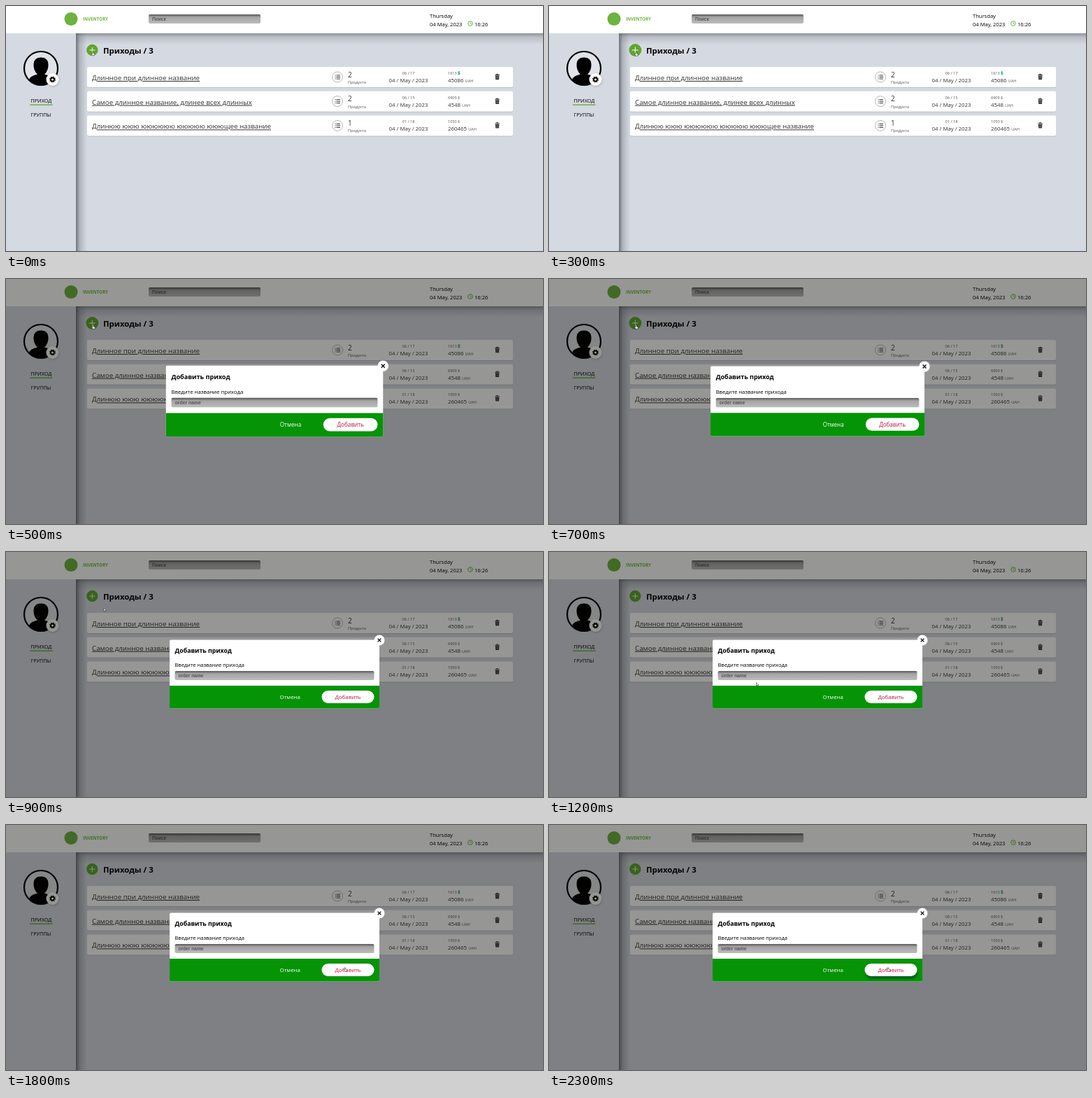
These frames come from a looping animation (768 px wide and 350 px high, 2.5 s). An HTML page:

```html
<!DOCTYPE html>
<html lang="ru">
<head>
<meta charset="utf-8">
<style>
  html, body { margin: 0; height: 100%; overflow: hidden; background: #d5d9e2; }
  svg { display: block; width: 768px; height: 350px; font-family: "Open Sans", "Noto Sans", sans-serif; }
  .field { font: bold 6.6px "Liberation Sans", sans-serif; fill: #555; }
</style>
</head>
<body>
<svg id="stage" viewBox="0 0 768 350">
  <defs>
    <linearGradient id="left"><stop stop-color="#4c505a" stop-opacity=".75"/><stop offset=".35" stop-color="#5c606a" stop-opacity=".3"/><stop offset="1" stop-color="#6c707a" stop-opacity="0"/></linearGradient>
    <linearGradient id="top" x2="0" y2="1"><stop stop-color="#5c606a" stop-opacity=".6"/><stop offset=".35" stop-color="#6c707a" stop-opacity=".25"/><stop offset="1" stop-color="#6c707a" stop-opacity="0"/></linearGradient>
    <linearGradient id="inset" x2="0" y2="1"><stop stop-color="#555"/><stop offset=".3" stop-color="#a4a4a4"/><stop offset="1" stop-color="#bcbcbc"/></linearGradient>
    <filter id="soft" x="-30%" y="-60%" width="160%" height="220%"><feGaussianBlur stdDeviation="1.8"/></filter>
  </defs>
  <g id="page"></g>
  <g id="modal"></g>
  <g id="cursor" fill="#fff" stroke="#222" stroke-width=".7" stroke-linejoin="round">
    <path id="hand" d="M-1 0Q0-1 1 0V2.5L3.4 3.3Q4 3.6 3.7 5L3 7H-.6L-2.6 4.3Q-2.6 3.3-1 4Z"/>
    <path id="arrow" d="M0 0V6L1.5 4.7L2.6 7L3.6 6.5L2.6 4.4H4.4Z"/>
  </g>
</svg>
<script>
const $ = id => document.getElementById(id);
const text = (s, x, y, size, attrs = '') => `<text x="${x}" y="${y}" font-size="${size}" ${attrs}>${s}</text>`;
const rect = (x, y, w, h, fill, r = 0, attrs = '') =>
  `<rect x="${x}" y="${y}" width="${w}" height="${h}" rx="${r}" fill="${fill}" ${attrs}/>`;
const circle = (x, y, r, fill, attrs = '') => `<circle cx="${x}" cy="${y}" r="${r}" fill="${fill}" ${attrs}/>`;
const field = (s, x, y, w) => rect(x, y, w, 13, 'url(#inset)', 2) + `<text class="field" x="${x + 5}" y="${y + 9.3}">${s}</text>`;
const bold = 'font-weight="700"', grey = 'fill="#555"', middle = 'text-anchor="middle"';

const trash = `<path d="M699.3 98.5h6.6M701.5 98.3v-1h2.2v1" stroke="#333" fill="none"/>
  <path d="M699.8 99.6h5.6l-.4 5.6h-4.8z" fill="#333"/><path d="M701.6 100.6v3.6M703.6 100.6v3.6" stroke="#aaa" stroke-width=".6"/>`;
const list = circle(474, 101.5, 7.5, '#fff', 'stroke="#999" stroke-width=".7"') +
  [99, 101.5, 104].map(y => `<path d="M470.5 ${y}h1M472.5 ${y}h5.5" stroke="#333"/>`).join('');

const row = ([title, count, time, usd, uah, mark], i) => `<g transform="translate(0 ${i * 34.7})">
  ${rect(116, 88, 609, 29, '#8a8f9a', 2, 'opacity=".35"')}${rect(116, 87, 609, 29, '#fff', 2)}
  ${text(title, 123, 106, 9.75, 'fill="#333" text-decoration="underline"')}
  ${list}${text(count, 489, 101.8, 10, 'fill="#333"')}${text('Продукта', 489, 111, 5.7, grey)}
  ${text(time, 575.5, 98, 5.7, grey + middle)}${text('04 / May / 2023', 575.5, 109, 7.8, 'fill="#333"' + middle)}
  ${text(`${usd} <tspan ${mark}>$</tspan>`, 632, 98, 5.5, grey)}
  ${text(`${uah} <tspan font-size="5.6" fill="#555">UAH</tspan>`, 632, 109, 7.9, 'fill="#333"')}${trash}</g>`;

const rows = [
  ['Длинное при длинное название', 2, '06 / 17', 1613, 45086, 'fill="#1a9a88" font-weight="700" font-size="6.5"'],
  ['Самое длинное название, длинее всех длинных', 2, '06 / 15', 6909, 4548, ''],
  ['Длинюю ююю юююююю ююююю ююющее название', 1, '01 / 18', 1050, 260465, '']
];

$('page').innerHTML =
  rect(0, 0, 768, 350, '#d5d9e2') + rect(100, 39, 16, 311, 'url(#left)') + rect(100, 39, 668, 16, 'url(#top)') +
  rect(0, 0, 768, 39, '#fff') + circle(93, 18.5, 9.5, '#6cb33f') +
  text('INVENTORY', 110, 21, 6.2, bold + 'fill="#72b840"') + field('Поиск', 204, 12, 160) +
  text('Thursday', 606, 16.5, 7.6) + text('04 May, 2023', 606, 28.5, 7.6) + text('16:26', 670, 28.5, 7.6) +
  circle(664, 25, 3.3, 'none', 'stroke="#6cb33f"') + '<path d="M664 23v2.2h1.8" fill="none" stroke="#6cb33f" stroke-width=".8"/>' +
  circle(50, 89, 24, '#e0e3ea', 'stroke="#000" stroke-width="2.2"') +
  '<path d="M33 105.5Q34 100 45 97.5Q39 92 39.5 83Q40 73.5 50 73.5T60.500 83Q61 92 55 97.5Q66 100 67 105.500A24 24 0 0 1 33 105.500Z"/>' +
  circle(67, 106, 9, '#777', 'opacity=".5" filter="url(#soft)"') + circle(66.5, 105, 9, '#fff') +
  circle(66.5, 105, 2.5, 'none', 'stroke="#000" stroke-width="1.8"') +
  circle(66.5, 105, 3.9, 'none', 'stroke="#000" stroke-width="1.2" stroke-dasharray="1.53"') +
  text('ПРИХОД', 50.3, 138, 7.3, middle) + rect(34, 140.5, 32.5, 1.5, '#6cb33f') + text('ГРУППЫ', 50, 158.3, 7.1, middle) +
  `<g id="plus">${circle(0, 0, 8.2, '#5fa62f')}<path d="M-4 0H4M0-4V4" stroke="#fff" stroke-width=".9"/></g>` +
  text('Приходы / 3', 139, 67.5, 11.4, bold) + rows.map(row).join('');

$('modal').innerHTML =
  rect(0, 0, 768, 350, '#070700', 0, 'opacity=".42"') + rect(234, 125.5, 300, 98, '#fff', 2) +
  '<path d="M234 191H534V221.500Q534 223.500 532 223.500H236Q234 223.500 234 221.500Z" fill="#059405"/>' +
  text('Добавить приход', 241.5, 144, 8.8, bold) + text('Введите название прихода', 241.5, 164, 7.5) +
  field('order name', 241.5, 170, 285) + text('Отмена', 391.5, 210, 7.9, 'fill="#fff"') +
  rect(453, 202, 74, 18, '#023', 9, 'id="shadow" filter="url(#soft)"') + rect(451.5, 198, 75, 18, '#fff', 9, 'id="button"') +
  text('Добавить', 489, 210, 7.9, 'fill="#c2103c"' + middle) +
  circle(534, 126, 7.5, '#fff') + '<path d="M531.600 123.600l4.800 4.800m0-4.800l-4.800 4.800" stroke="#000" stroke-width="1.3"/>';

// Linear interpolation through [time, value] pairs
function track(keys, t) {
  const i = keys.findIndex(k => k[0] > t);
  if (i < 0) return keys[keys.length - 1][1];
  if (!i) return keys[0][1];
  const [t0, a] = keys[i - 1], [t1, b] = keys[i];
  return a + (b - a) * (t - t0) / (t1 - t0);
}
const pop = [[400, .96], [500, 1.035], [600, 1.035], [700, 1.02], [800, 1]];
const shade = [[1400, 0], [1600, .4], [1700, .3], [1800, 0], [2000, 0], [2300, .45]];
const cursorX = [[200, 124], [300, 124.5], [800, 124.5], [900, 140], [1200, 296.5], [1400, 514], [1500, 490], [1600, 485]];
const cursorY = [[200, 65.5], [300, 66], [800, 66], [900, 80], [1200, 186.5], [1400, 210], [1600, 204]];

function draw(now) {
  const t = Math.floor(now % 2500 / 100) * 100;
  const hover = t >= 300 && t < 900;
  $('plus').setAttribute('transform', `translate(123.300 63) scale(${hover ? 1.09 : 1})`);
  $('modal').setAttribute('visibility', t < 400 ? 'hidden' : 'visible');
  $('modal').setAttribute('transform', `translate(384 174.500) scale(${track(pop, t)}) translate(-384 -174.500)`);
  $('shadow').setAttribute('opacity', track(shade, t));
  $('cursor').setAttribute('transform', `translate(${track(cursorX, t)} ${track(cursorY, t)}) scale(.75)`);
  const pointing = t < 900 || t >= 1400;
  $('hand').style.display = pointing ? '' : 'none';
  $('arrow').style.display = pointing ? 'none' : '';
  requestAnimationFrame(draw);
}
requestAnimationFrame(draw);
</script>
</body>
</html>
```
